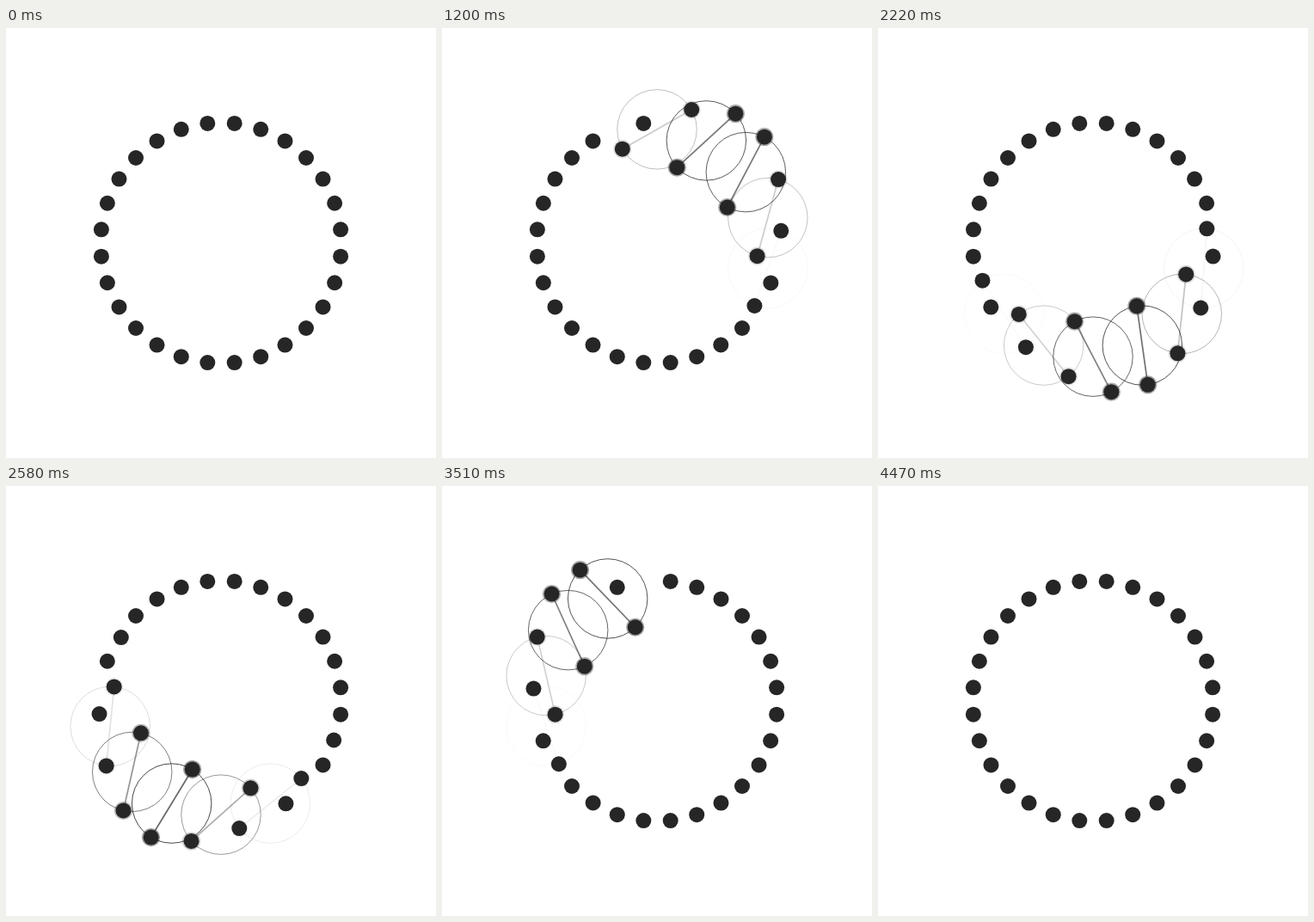
An HTML page with a canvas for the animation above (5.17 s loop, 500x500 px).

```html
<!DOCTYPE html>
<html lang="en">
<head>
<meta charset="utf-8">
<title>Swapping dots</title>
<style>
  html, body { margin: 0; height: 100%; overflow: hidden; background: #fff; }
  canvas { display: block; width: 500px; height: 500px; }
</style>
</head>
<body>
<canvas id="stage" width="500" height="500"></canvas>
<script>
const ctx = document.getElementById('stage').getContext('2d');

const LOOP = 5170, TICK = 30;
const START = 3, STAGGER = 207.7, TURN = 1780;
const PAIRS = 14, STEP = 2 * Math.PI / PAIRS;
const RING = 140, DOT = 9;

// Each pair spans three dot gaps and swaps places around its own midpoint.
const HALF_SPAN = 0.75 * STEP;
const ORBIT = RING * Math.sin(HALF_SPAN);
const MID = RING * Math.cos(HALF_SPAN);

const ink = alpha => `rgba(38,38,38,${alpha})`;
const ease = x => x ** 4 * (35 - 84 * x + 70 * x * x - 20 * x ** 3);

function pairAt(k, time) {
  const progress = Math.min(1, Math.max(0, (time - START - k * STAGGER) / TURN));
  const turn = Math.PI * ease(progress);
  const x = 250 + MID * Math.sin(k * STEP);
  const y = 250 - MID * Math.cos(k * STEP);
  const dx = ORBIT * Math.cos(k * STEP + turn);
  const dy = ORBIT * Math.sin(k * STEP + turn);
  const glow = Math.max(0, Math.sin(turn)) ** 1.5;
  return { x, y, glow, dots: [[x - dx, y - dy], [x + dx, y + dy]] };
}

function circle(x, y, r) {
  ctx.beginPath();
  ctx.arc(x, y, r, 0, 2 * Math.PI);
}

function drawGuides({ x, y, glow, dots }) {
  ctx.strokeStyle = ink(0.85 * glow);
  ctx.lineWidth = 1;
  circle(x, y, ORBIT);
  ctx.stroke();

  ctx.strokeStyle = ink(0.7 * glow);
  ctx.lineWidth = 1.7;
  ctx.beginPath();
  ctx.moveTo(...dots[0]);
  ctx.lineTo(...dots[1]);
  ctx.stroke();
}

function drawDots({ glow, dots }) {
  for (const [x, y] of dots) {
    ctx.fillStyle = ink(0.45 * glow);
    circle(x, y, DOT + 1.6);
    ctx.fill();
    ctx.fillStyle = ink(1);
    circle(x, y, DOT);
    ctx.fill();
  }
}

function draw(now) {
  const time = Math.floor((now % LOOP) / TICK) * TICK;
  const pairs = Array.from({ length: PAIRS }, (_, k) => pairAt(k, time));
  ctx.fillStyle = '#fff';
  ctx.fillRect(0, 0, 500, 500);
  pairs.forEach(drawGuides);
  pairs.forEach(drawDots);
}

let begin;
function frame(now) {
  begin ??= now;
  draw(now - begin);
  requestAnimationFrame(frame);
}
draw(0);
requestAnimationFrame(frame);
</script>
</body>
</html>
```
